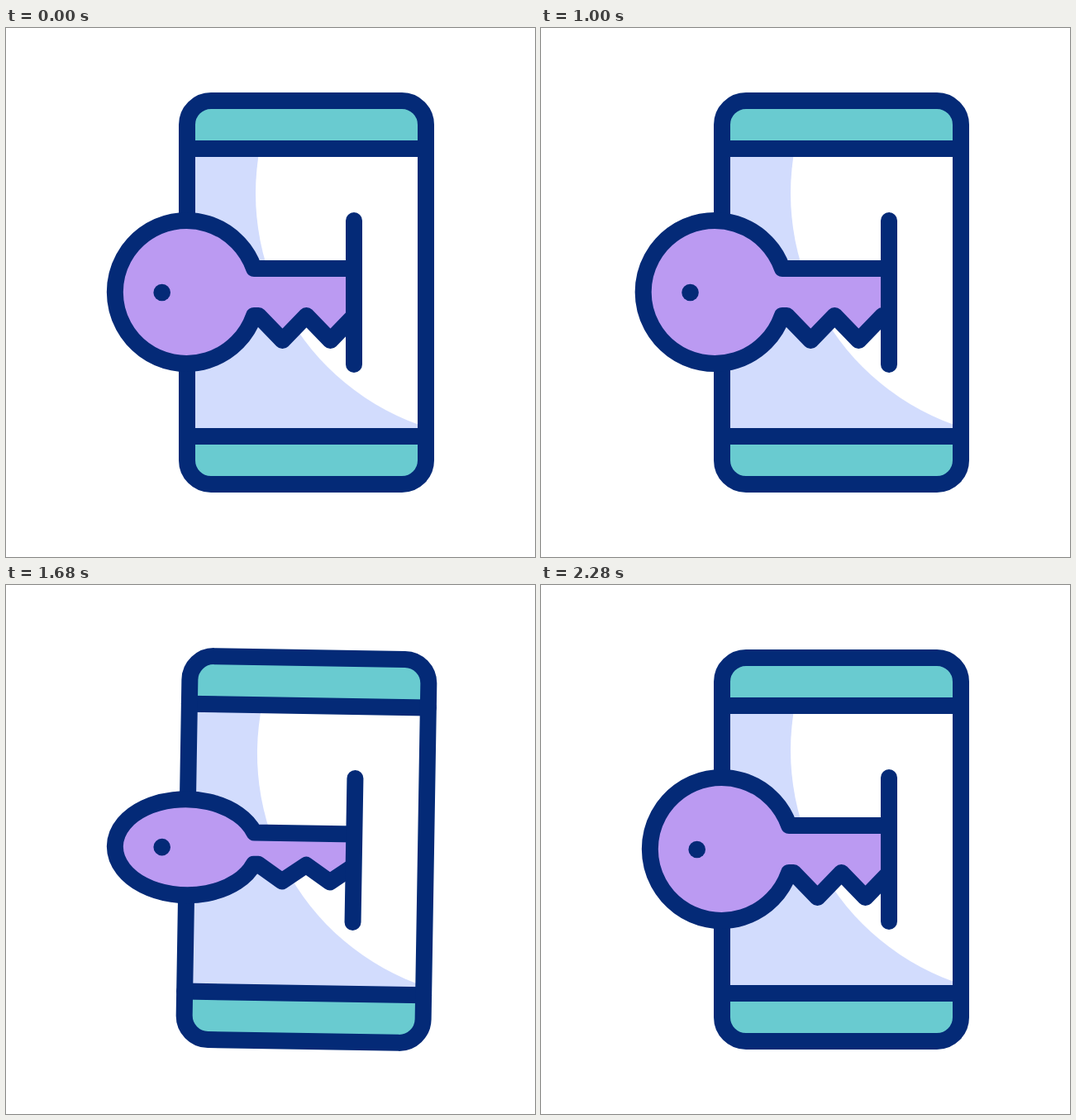
These frames come from a looping animation (640x640 px, 2520 ms). An HTML page:

```html
<!DOCTYPE html>
<html lang="en">
<head>
<meta charset="utf-8">
<title>Key and phone</title>
<style>
  html, body { margin: 0; width: 100%; height: 100%; overflow: hidden; background: #fff; }
  svg { display: block; }
  .line { fill: none; stroke: #042a77; stroke-width: 20; stroke-linecap: round; stroke-linejoin: round; }
  .ray { stroke: #eb640a; stroke-width: 20; stroke-linecap: round; }
</style>
</head>
<body>
<svg width="640" height="640" viewBox="0 0 640 640">
  <defs>
    <clipPath id="body"><rect x="219" y="88" width="289" height="464" rx="29"/></clipPath>
    <clipPath id="screen"><rect x="219" y="146" width="289" height="348"/></clipPath>
    <clipPath id="slot"><rect x="0" y="0" width="421" height="640"/></clipPath>
  </defs>
  <g id="scene">
    <g id="rays"></g>
    <g clip-path="url(#body)">
      <rect x="219" y="88" width="289" height="464" fill="#69cbd0"/>
      <rect x="219" y="146" width="289" height="348" fill="#d2dcfd"/>
      <circle cx="599" cy="200" r="297" fill="#fff" clip-path="url(#screen)"/>
    </g>
    <path class="line" d="M219 146H508M219 494H508"/>
    <rect class="line" x="219" y="88" width="289" height="464" rx="29"/>
    <g clip-path="url(#slot)">
      <g id="key">
        <path id="blade" class="line" style="fill:#bb9af2" vector-effect="non-scaling-stroke"
          d="M480 -29H300A86.5 86.5 0 1 0 300 28H305.5L334.5 58L363.5 28L392.5 58L421.5 28L450.5 58L480 28Z"/>
        <circle cx="188.7" cy="320" r="10.3" fill="#042a77"/>
      </g>
    </g>
    <path class="line" d="M421 233V407"/>
  </g>
</svg>
<script>
const LOOP = 2520, STEP = 40;
const $ = id => document.getElementById(id);
const smooth = u => u * u * (3 - 2 * u);
const easeIn = u => u * u;

// Each track is a list of [time, value, easing towards that value].
const tracks = {
  slide: [[220, 0], [700, -22.3], [820, -22.3], [1125, 0]],
  push: [[1110, 0], [1240, 5.7], [1460, 0]],
  turn: [[1370, 1], [1880, 0.5], [2115, 1]],
  tilt: [[1450, 0], [1860, 3, easeIn], [2030, -1.92], [2280, 0]],
  rayTip: [[1860, 0], [2040, 1]],
  rayTail: [[1990, 0], [2250, 1]]
};

function valueAt(track, t) {
  let [t0, v0] = track[0];
  for (const [t1, v1, ease = smooth] of track) {
    if (t < t1) return t <= t0 ? v0 : v0 + (v1 - v0) * ease((t - t0) / (t1 - t0));
    [t0, v0] = [t1, v1];
  }
  return v0;
}

// Inner end, then outer end.
const rays = [
  [124.2, 184.5, 102.7, 162.7],
  [56, 320, 27, 320],
  [124.2, 462.5, 103.6, 483]
].map(ends => {
  const el = document.createElementNS("http://www.w3.org/2000/svg", "line");
  el.setAttribute("class", "ray");
  $("rays").append(el);
  return { el, ends };
});

function drawRays(tail, tip) {
  $("rays").style.display = tip > tail ? "" : "none";
  for (const { el, ends: [x0, y0, x1, y1] } of rays) {
    const put = (n, u) => {
      el.setAttribute("x" + n, x0 + (x1 - x0) * u);
      el.setAttribute("y" + n, y0 + (y1 - y0) * u);
    };
    put(1, tail);
    put(2, tip);
  }
}

function draw(t) {
  const at = name => valueAt(tracks[name], t);
  $("scene").setAttribute("transform", `translate(${at("push")} 0) rotate(${at("tilt")} 363.5 320)`);
  $("key").setAttribute("transform", `translate(${at("slide")} 0)`);
  $("blade").setAttribute("transform", `translate(0 320) scale(1 ${at("turn")})`);
  drawRays(at("rayTail"), at("rayTip"));
}

const start = performance.now();
function frame() {
  const t = (performance.now() - start) % LOOP;
  draw(Math.floor(t / STEP) * STEP);
  requestAnimationFrame(frame);
}
frame();
</script>
</body>
</html>
```
